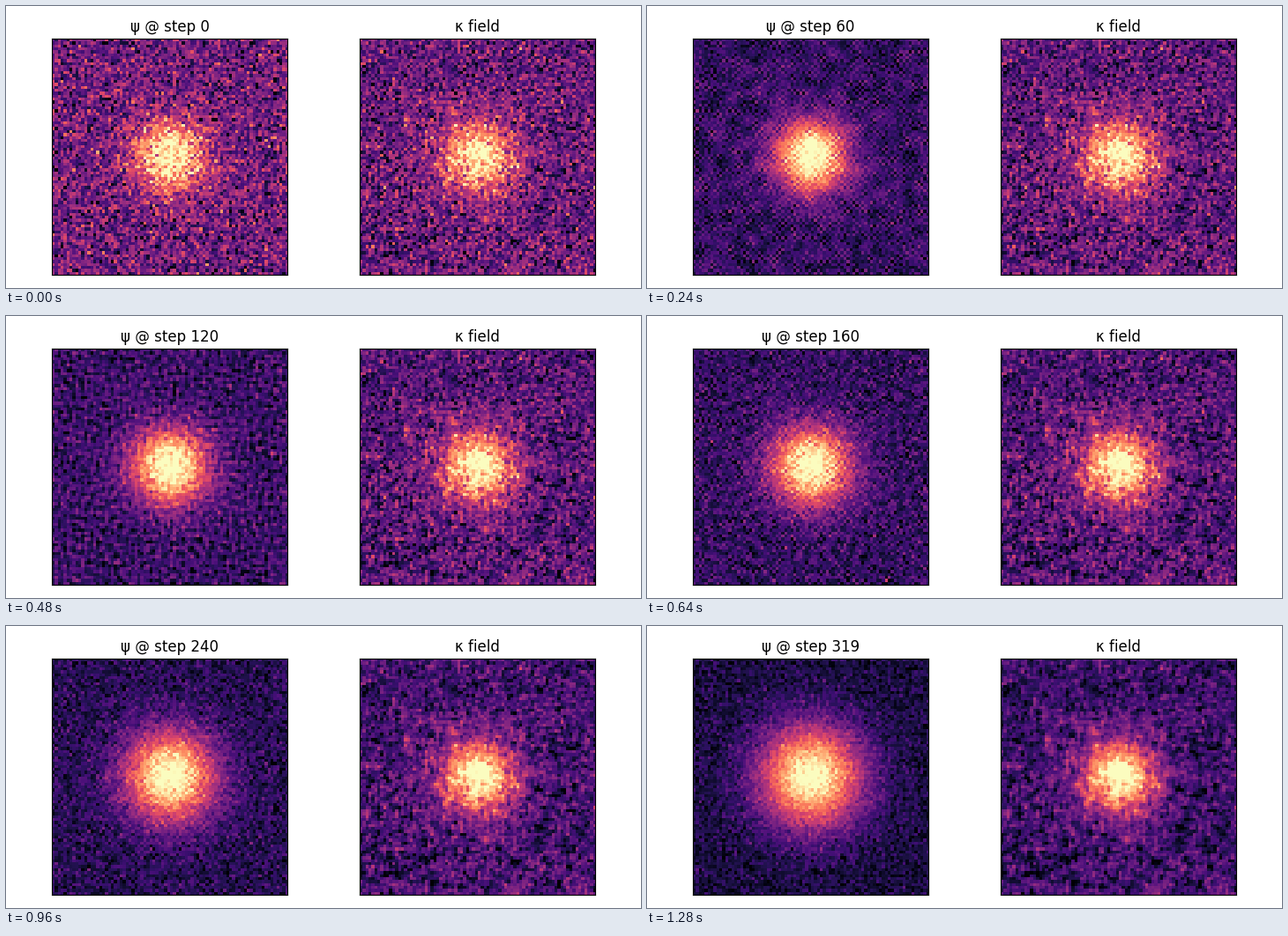
Write a matplotlib script that moves like this. It is 720x320 px and loops after 1.36 s.

```python
import numpy as np
import matplotlib.pyplot as plt
from matplotlib.animation import FuncAnimation

W, H, DPI = 720, 320, 100
N = 80
FRAMES, INTERVAL = 17, 80
LAST_STEP = 319
NOISE = 0.2

rng = np.random.default_rng(7)
_, kappa_hat, psi_hat = np.fft.fft2(rng.normal(0, NOISE, (3, N, N)))

# Eigenvalues of the negative five-point Laplacian, 0 to 8
wave = 2 - 2 * np.cos(2 * np.pi * np.fft.fftfreq(N))
lap = wave[:, None] + wave[None, :]

axis = np.arange(N) - (N - 1) / 2
r2 = axis[:, None] ** 2 + axis[None, :] ** 2


def blob(sigma):
    return np.exp(-r2 / (2 * sigma ** 2))


def filtered(spectrum, gain):
    return np.fft.ifft2(spectrum * gain).real


def psi_field(step):
    """Spreading blob over damped, dispersive wave noise."""
    gain = np.exp(-0.0025 * step) * np.cos(0.016 * np.sqrt(lap) * step)
    sigma = np.hypot(8.4, 0.027 * step)
    return blob(sigma) + filtered(psi_hat, gain)


def kappa_field(step):
    """Steady blob over slowly diffusing noise."""
    return blob(8.8) + filtered(kappa_hat, np.exp(-0.2 * lap * step / LAST_STEP))


def show(image, field):
    image.set_data(field)
    image.set_clim(*np.percentile(field, [1, 99]))


def panel(ax, title):
    ax.set_xticks([])
    ax.set_yticks([])
    image = ax.imshow(np.zeros((N, N)), cmap="magma", interpolation="nearest")
    return image, ax.set_title(title, fontsize=12)


plt.rcParams["font.family"] = "DejaVu Sans"
fig, (left, right) = plt.subplots(1, 2, figsize=(W / DPI, H / DPI), dpi=DPI,
                                  facecolor="white")
psi_image, psi_title = panel(left, "ψ @ step 0")
kappa_image, _ = panel(right, "κ field")
fig.tight_layout()


def update(i):
    step = min(20 * i, LAST_STEP)
    show(psi_image, psi_field(step))
    show(kappa_image, kappa_field(step))
    psi_title.set_text(f"ψ @ step {step}")
    return psi_image, kappa_image, psi_title


anim = FuncAnimation(fig, update, frames=FRAMES, interval=INTERVAL,
                     repeat=True, repeat_delay=0, blit=False)
plt.show()
```
